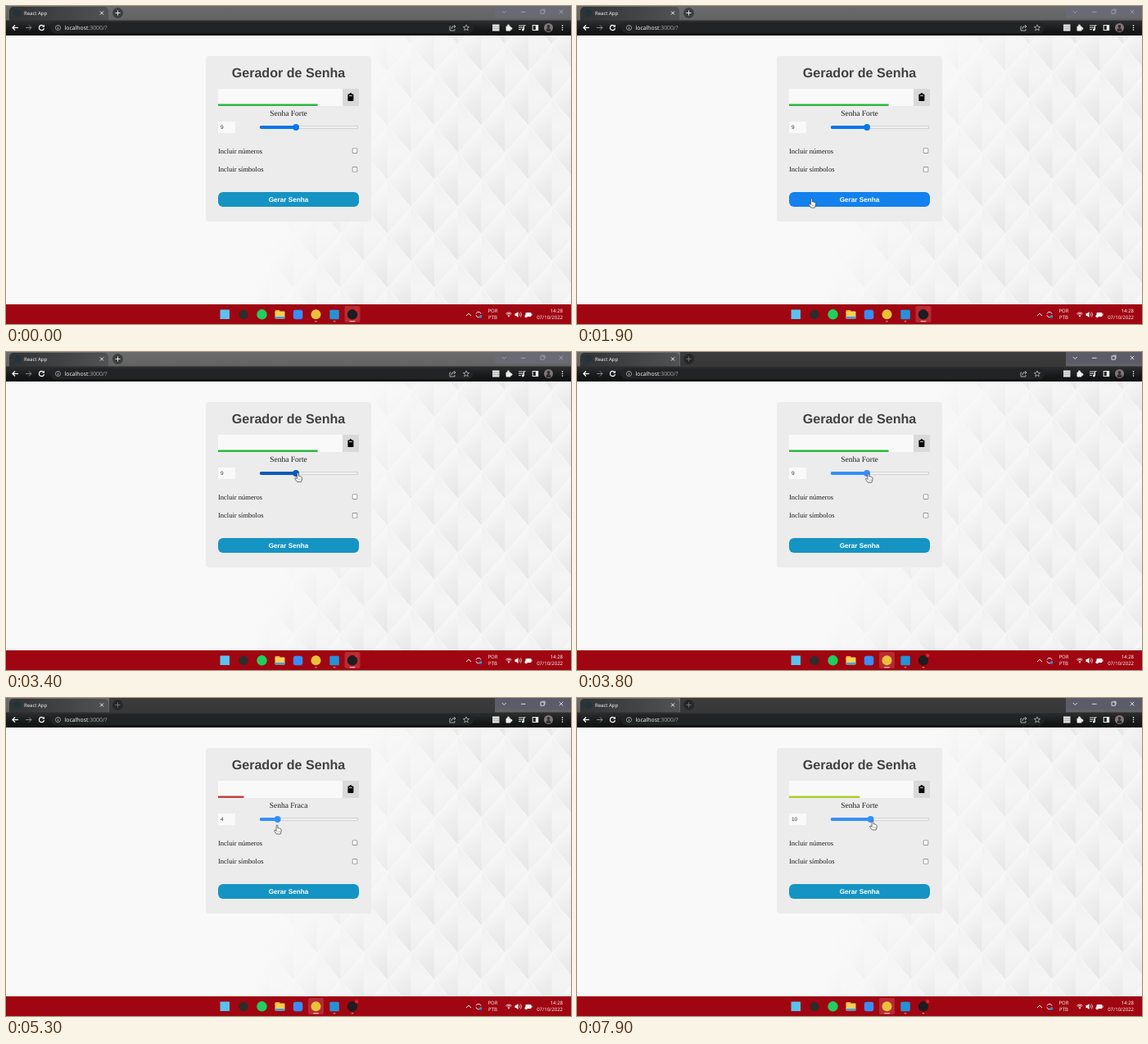
An HTML page with a canvas that plays this animation: 690 px wide and 388 px high, repeating every 8 s.

```html
<!DOCTYPE html>
<html lang="pt-BR">
<head>
<meta charset="utf-8">
<title>Gerador de Senha</title>
<style>
html, body { margin: 0; width: 100%; height: 100%; overflow: hidden; background: #f9f9f9; }
canvas { display: block; width: 690px; height: 388px; }
</style>
</head>
<body>
<canvas id="stage"></canvas>
<script>
const W = 690, H = 388, LOOP = 8000;
const SANS = '"Liberation Sans", Arial, sans-serif';
const SERIF = '"Liberation Serif", "Times New Roman", serif';
const UI = '"Open Sans", sans-serif';
const dpr = window.devicePixelRatio || 1;

function makeContext(canvas) {
  canvas.width = W * dpr;
  canvas.height = H * dpr;
  const c = canvas.getContext('2d');
  c.scale(dpr, dpr);
  c.textRendering = 'geometricPrecision';
  return c;
}

const stage = makeContext(document.getElementById('stage'));
const backdrop = document.createElement('canvas');
let g = makeContext(backdrop);

function rect(x, y, w, h, fill, r = 0) {
  g.fillStyle = fill;
  g.beginPath();
  g.roundRect(x, y, w, h, r);
  g.fill();
}
function disc(x, y, r, fill) {
  g.fillStyle = fill;
  g.beginPath();
  g.arc(x, y, r, 0, 7);
  g.fill();
}
function trace(points, close) {
  g.beginPath();
  for (let i = 0; i < points.length; i += 2) g.lineTo(points[i], points[i + 1]);
  if (close) g.closePath();
}
function line(points, color = '#e4e4e4', width = 1) {
  trace(points);
  g.strokeStyle = color;
  g.lineWidth = width;
  g.stroke();
}
function poly(points, fill) {
  trace(points, true);
  g.fillStyle = fill;
  g.fill();
}
function ring(x, y, r, color, width = 1, from = 0, to = 6.3) {
  g.beginPath();
  g.arc(x, y, r, from, to);
  g.strokeStyle = color;
  g.lineWidth = width;
  g.stroke();
}
function box(x, y, w, h, color, width = 1) {
  g.strokeStyle = color;
  g.lineWidth = width;
  g.strokeRect(x, y, w, h);
}
function label(str, x, y, font, fill, align = 'left') {
  g.font = font;
  g.fillStyle = fill;
  g.textAlign = align;
  g.fillText(str, x, y);
}
function gradient(x0, y0, x1, y1, ...stops) {
  const lg = g.createLinearGradient(x0, y0, x1, y1);
  stops.forEach((c, i) => lg.addColorStop(i / (stops.length - 1), c));
  return lg;
}

function drawWallpaper() {
  rect(0, 36, W, 328, '#f9f9f9');
  g.save();
  g.beginPath();
  g.rect(0, 36, W, 328);
  g.clip();
  const hw = 28.7, hh = 33;
  for (let row = 0; row < 13; row++) {
    for (let col = 0; col < 9; col++) {
      const x = 265 + col * hw * 2 + (row % 2) * hw;
      const y = 15 + row * hh;
      const top = y - hh, end = y + hh;
      poly([x, top, x, end, x - hw, y], gradient(x - hw, y - 8, x, end, '#f6f6f6', '#ebebeb', '#e4e4e4'));
      poly([x, top, x, end, x + hw, y], gradient(x, top, x + hw / 2, end, '#f0f0f0', '#f4f4f4', '#ededed'));
      line([x - hw, y, x, end, x + hw, y], '#f8f8f8', 1.6);
    }
  }
  const near = 410, far = 570;
  rect(0, 36, W, 328, gradient(near * .906, near * .425, far * .906, far * .425,
    'rgba(249,249,249,1)', 'rgba(249,249,249,.4)', 'rgba(249,249,249,.08)'));
  g.restore();
}

function drawBrowser() {
  rect(0, 0, W, 18, gradient(0, 0, 0, 18, '#6c6c6c', '#626262'));
  rect(4, 1, 121, 18, gradient(4, 0, 125, 0, '#303234', '#505253'), [5, 5, 0, 0]);
  disc(14, 8.5, 4.3, '#22343c');
  label('React App', 22, 10.8, '6px ' + UI, '#fff');
  line([115, 6.5, 119, 10.5], '#fff', .9);
  line([119, 6.5, 115, 10.5], '#fff', .9);
  disc(136.5, 8.5, 6.5, '#3d3e3f');
  line([133.5, 8.5, 139.5, 8.5]);
  line([136.5, 5.5, 136.5, 11.5]);

  rect(0, 17.5, W, 18.5, gradient(0, 17, 0, 36, '#2f3031', '#1c1d1e', '#0d0e0e'));
  rect(54, 20, 517, 13, '#212324', 6.5);
  line([15, 26.5, 8, 26.5], '#fff', 1.2);
  line([11, 23.5, 8, 26.5, 11, 29.5], '#fff', 1.2);
  line([24, 26.5, 31, 26.5], '#888');
  line([28, 23.5, 31, 26.5, 28, 29.5], '#888');
  ring(43.5, 26.5, 3, '#fff', 1.2, .2, 5.5);
  poly([44, 25.7, 47, 25.7, 47, 22.7], '#fff');
  ring(63.5, 26.5, 3, '#ccc', .7);
  line([63.5, 26, 63.5, 28.2], '#ccc', .8);
  line([63.5, 24.6, 63.5, 25.3], '#ccc', .8);
  label('localhost', 71.5, 29, '6.9px ' + UI, '#fff');
  const hostWidth = g.measureText('localhost').width;
  label(':3000/?', 71.5 + hostWidth, 29, '6.9px ' + UI, '#a9acae');

  line([543, 25, 542, 25, 542, 30, 548, 30, 548, 28], '#ccc', .8);
  line([544, 28, 545, 25, 549, 25], '#ccc', .8);
  line([547, 23, 549, 25, 547, 27], '#ccc', .8);
  const star = [];
  for (let i = 0; i <= 10; i++) {
    const a = i * Math.PI / 5 - Math.PI / 2, r = i % 2 ? 1.7 : 3.8;
    star.push(562 + r * Math.cos(a), 26.7 + r * Math.sin(a));
  }
  line(star, '#ccc', .7);
  rect(594, 22.5, 8.5, 8, '#e6e6e6');
  line([594, 25.2, 602.5, 25.2], '#777', .6);
  line([594, 27.8, 602.5, 27.8], '#777', .6);
  rect(610.5, 24.5, 6, 6, '#eee', 1);
  disc(613.5, 24, 1.4, '#eee');
  disc(617, 27.5, 1.4, '#eee');
  for (let i = 0; i < 3; i++) line([626, 24 + i * 2.3, i < 2 ? 632 : 629, 24 + i * 2.3], '#eee', .9);
  line([634.5, 23.7, 632.5, 23.7, 632.5, 29], '#eee', 1);
  disc(631.3, 29, 1.4, '#eee');
  box(643.2, 23.5, 6.5, 6, '#eee');
  rect(646.8, 23.5, 3, 6, '#eee');
  disc(662.5, 26.5, 5.5, '#81777a');
  disc(662.5, 25, 1.9, '#332d30');
  rect(659.5, 27, 6, 4, '#332d30', [3, 3, 1, 1]);
  for (let i = -1; i < 2; i++) disc(679.5, 26.5 + i * 2.6, .8, '#eee');
}

function drawCard() {
  rect(244, 61, 202, 202, '#ececec', 4);
  label('Gerador de Senha', 345, 86.7, 'bold 16.1px ' + SANS, '#414144', 'center');
  rect(259, 101, 152, 21, '#f9f9f9');
  rect(411, 101, 20, 21, '#d9d9d9');
  rect(417.4, 107.6, 7, 8.4, '#080808', .8);
  disc(420.9, 107.6, 1.5, '#080808');
  rect(419, 109, 3.8, .9, '#d9d9d9');
  rect(259, 141, 21, 14, '#f9f9f9');
  label('Incluir números', 259, 179.6, '8.5px ' + SERIF, '#1c1c1c');
  label('Incluir símbolos', 259, 202.4, '8.5px ' + SERIF, '#1c1c1c');
  for (const y of [173.4, 196.2]) {
    rect(422.8, y, 6.4, 6.4, '#767676', 1.3);
    rect(423.5, y + .7, 5, 5, '#fff', .7);
  }
}

function drawTaskbar() {
  rect(0, 364, W, 24, '#9f0611');
  line([562, 378, 565, 375, 568, 378], '#fff', .9);
  ring(577, 376.5, 3.2, '#d9e6f2', 1, .3, 2.9);
  ring(577, 376.5, 3.2, '#d9e6f2', 1, 3.5, 6);
  disc(579.5, 379, 1.8, '#2e8de0');
  const small = '6px ' + UI;
  label('POR', 594.5, 374.2, small, '#fff', 'center');
  label('PTB', 594.5, 382.4, small, '#fff', 'center');
  for (const r of [1.8, 3.5, 5]) ring(614, 379, r, '#fff', .8, -2.35, -.8);
  disc(614, 378.7, .8, '#fff');
  poly([621.5, 375, 623, 375, 625.5, 373, 625.5, 380, 623, 378, 621.5, 378], '#fff');
  ring(625.5, 376.5, 2, '#fff', .7, -.9, .9);
  ring(625.5, 376.5, 4, '#fff', .7, -.9, .9);
  rect(634.5, 374, 7, 5, '#fff', 1);
  rect(641.5, 375.5, 1, 2, '#fff');
  disc(635.2, 378.5, 1.8, '#fff');
  label('14:28', 680, 374.2, small, '#fff', 'right');
  label('07/10/2022', 680, 382.4, small, '#fff', 'right');
}

function drawApps(focused) {
  const active = focused ? 378.5 : 423;
  rect(active - 9.5, 366, 19, 20, '#b62a33', 2);
  rect(261.5, 370.5, 11.5, 11.5, '#58c3ef', .5);
  disc(290, 376.5, 5.8, '#302c2b');
  disc(312.5, 376.3, 6.2, '#1fcf5f');
  rect(328.5, 371, 6, 4, '#e3a72c', 1);
  rect(328.5, 372.5, 12, 9, '#f8cf55', 1);
  rect(328.5, 379, 12, 2.5, '#4a9fd8', [0, 0, 1, 1]);
  rect(350.8, 370.8, 11.5, 11.5, '#3b8cf5', 3);
  disc(378.5, 376.2, 6, '#ebc13a');
  rect(395.3, 370.8, 11.5, 11.5, '#2492d7', 1.5);
  disc(423, 376.3, 6.2, '#1e1c20');
  disc(428.2, 370.3, 2.2, '#e3202c');
  for (const x of [378.5, 401, 423]) {
    const w = x === active ? 7 : 3;
    rect(x - w / 2, 384, w, 1.4, x === active ? '#f0a09e' : '#c9777a', .7);
  }
}

function drawWindowButtons(focused) {
  rect(597, 0, 93, 14.5, focused ? '#5b5c68' : '#6a6a74', [0, 0, 0, 3]);
  const c = focused ? '#f0f0f2' : '#a4a4ac';
  line([605.8, 6, 608.3, 8.5, 610.8, 6], c, .9);
  line([629, 7.3, 634.5, 7.3], c, .9);
  box(653, 5, 4.2, 4.2, c, .8);
  line([654.5, 4, 658.2, 4, 658.2, 8], c, .6);
  line([675.7, 4.8, 680.3, 9.4], c, .9);
  line([680.3, 4.8, 675.7, 9.4], c, .9);
}

// Timeline
const strengths = {
  Fraca: { width: 30.4, color: [186, 56, 58] },
  'Razoável': { width: 76, color: [214, 214, 42] },
  Forte: { width: 121.6, color: [42, 184, 62] }
};
const levels = [[-900, 'Forte'], [4200, 'Razoável'], [4900, 'Fraca'], [6850, 'Razoável'], [7815, 'Forte']];
const lengths = [[0, 9], [3900, 8], [4050, 7], [4200, 6], [4600, 5], [4850, 4],
  [5900, 5], [6200, 6], [6450, 7], [6850, 8], [7700, 9], [7800, 10]];
const path = [[1000, 322, 208], [1350, 283.8, 237], [1850, 283.8, 237], [2250, 345, 193], [2700, 412.5, 222],
  [2800, 412.5, 222], [3350, 356.3, 147.5], [3750, 356.3, 148], [4250, 339.8, 152], [4450, 339.8, 152],
  [4900, 331, 155], [5800, 331, 155], [6500, 346.8, 152], [6800, 346.8, 152],
  [6950, 351, 152], [7650, 351, 152], [7850, 361, 150], [8000, 361, 150]];

const clamp = v => Math.max(0, Math.min(1, v));
const mix = (a, b, k) => a + (b - a) * k;
const blend = (a, b, k) => `rgb(${a.map((v, i) => Math.round(mix(v, b[i], k)))})`;
const smooth = k => k * k * (3 - 2 * k);
const indexAt = (keys, t) => keys.findLastIndex(k => k[0] <= t);

// CSS "ease": cubic-bezier(.25, .1, .25, 1)
function ease(x) {
  let lo = 0, hi = 1, u = .5;
  for (let i = 0; i < 16; i++) {
    u = (lo + hi) / 2;
    const bx = .75 * u * (1 - u) + u ** 3;
    if (bx < x) lo = u; else hi = u;
  }
  return .3 * u * (1 - u) ** 2 + 3 * u * u * (1 - u) + u ** 3;
}

function drawStrength(t) {
  const i = indexAt(levels, t);
  const to = strengths[levels[i][1]];
  const from = strengths[levels[Math.max(0, i - 1)][1]];
  const k = ease(clamp((t - levels[i][0]) / 500));
  rect(259, 119.5, mix(from.width, to.width, k), 2.4, blend(from.color, to.color, k));
  label('Senha ' + levels[i][1], 345, 133.7, '9.5px ' + SERIF, '#1c1c1c', 'center');
}

function drawSlider(t) {
  const n = lengths[indexAt(lengths, t)][1];
  const x = 313.6 + n * 4.5;
  const color = t >= 3500 ? '#338ff8' : t >= 3250 ? '#0859bd' : '#0b76ea';
  label(n, 262, 150.4, '6.5px ' + SANS, '#333');
  rect(309.8, 145.9, 120.4, 4.2, '#b4b4b4', 2.1);
  rect(310.3, 146.4, 119.4, 3.2, '#f1f1f1', 1.6);
  rect(309.8, 145.9, x - 309.8, 4.2, color, 2.1);
  disc(x, 148, 3.9, color);
}

function drawButton(t) {
  const k = clamp((t - 1150) / 150) * clamp((2650 - t) / 150);
  rect(259, 227, 172, 18, blend([21, 148, 195], [18, 129, 238], k), 6);
  label('Gerar Senha', 345, 238.8, 'bold 8.2px ' + SANS, '#fff', 'center');
}

function drawCursor(t) {
  const i = indexAt(path, t);
  if (i < 0) return;
  const a = path[i], b = path[i + 1] || a;
  const k = smooth(clamp((t - a[0]) / (b[0] - a[0] || 1)));
  g.save();
  g.translate(mix(a[1], b[1], k), mix(a[2], b[2], k));
  g.lineJoin = 'round';
  trace([-.9, .6, 0, 0, .9, .6, 1, 3.8, 2.6, 3.9, 4, 4.5, 5.2, 5.4,
    5.1, 8, 4.1, 11, -.6, 11, -3.3, 7.4, -3.1, 6.2, -2, 6.2, -.9, 7.4], true);
  g.fillStyle = '#fff';
  g.fill();
  g.strokeStyle = '#333';
  g.lineWidth = .7;
  g.stroke();
  for (const x of [.9, 2.3, 3.7]) line([x, 7.2, x, 9.2], '#666', .4);
  g.restore();
}

drawWallpaper();
drawBrowser();
drawCard();
drawTaskbar();
g = stage;

function frame(now) {
  const t = Math.floor((now % LOOP) / 100) * 100;
  const focused = t >= 3600;
  g.drawImage(backdrop, 0, 0, W, H);
  // An inactive window has a paler tab strip
  if (focused) rect(126, 0, 471, 17.5, 'rgba(20,20,22,.55)');
  drawWindowButtons(focused);
  drawApps(focused);
  drawStrength(t);
  drawSlider(t);
  drawButton(t);
  drawCursor(t);
  requestAnimationFrame(frame);
}
frame(0);
</script>
</body>
</html>
```
